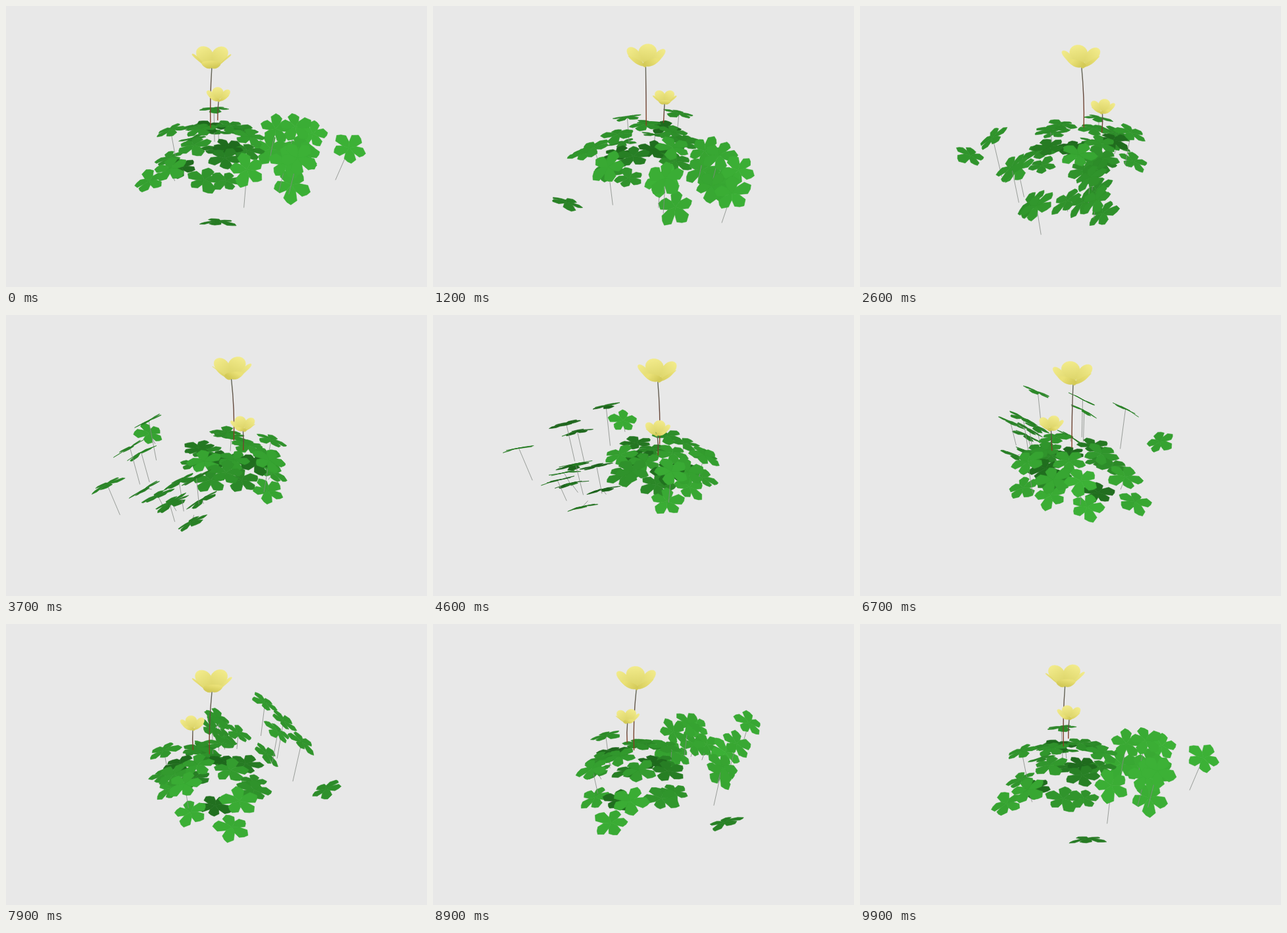
Recreate the animation shown at these times as an HTML page with a canvas. Size 640x427 px, loop 10000 ms.

```html
<!DOCTYPE html>
<html lang="en">
<head>
<meta charset="utf-8">
<title>Rotating plant</title>
<style>
  html, body { margin: 0; width: 100%; height: 100%; overflow: hidden; background: #e8e8e8; }
  canvas { display: block; width: 100vw; height: 100vh; }
</style>
</head>
<body>
<canvas id="stage" width="640" height="427"></canvas>
<script>
const ctx = document.getElementById('stage').getContext('2d');
const RAD = Math.PI / 180;
const STEP_MS = 100, STEPS = 100, STEP_DEG = 3.564;
const CX = 326, CY = 232;
const SIN = 0.52, COS = 0.855, DIST = 1065;
const GROUND = -15;

// Each leaf: distance from the axis, azimuth, height, optional facing azimuth.
const spots = [
  [190, 12, 42], [160, 91, 0, 270], [122, 73, 54], [117, -13, 41],
  [147, -14, 24], [127, 2, 10], [122, -8, 4], [118, 28, -11],
  [118, 39, 38], [134, 37, 50], [86, -24, -3], [119, -22, -21],
  [112, 160, -15], [85, 150, 9], [60, 113, -2], [50, 80, -8],
  [85, 199, -15], [60, 176, -13], [90, -92, -4], [80, -124, -2],
  [40, -93, -6], [45, -23, 5], [85, -97, 42], [45, 150, 37],
  [38, 80, 24], [42, 222, 36], [42, 290, 36], [45, -10, 34],
  [55, -50, 25], [75, 235, 22], [60, -105, 25], [85, 205, 30],
  [90, -20, 35], [12, 0, 20]
];

function seeded(seed) {
  return () => {
    seed = (seed * 16807) % 2147483647;
    return seed / 2147483647;
  };
}
const rand = seeded(4177);

const leaves = spots.map(([r, az, h, face]) => {
  const outer = r > 80;
  const cluster = outer && az > -30 && az < 80;
  const inShade = r < 65 && h < 26;
  return {
    r, az, h,
    face: face ?? (cluster ? 85 : az),
    tilt: cluster ? 30 + rand() * 8 : face ? 28 : r < 70 ? 9 : 15 + rand() * 9,
    size: 23.5 + rand() * 4.5,
    spin: rand() * 72,
    shade: inShade ? 0.35 + rand() * 0.5 : 0.86 + rand() * 0.16,
    lobes: Array.from({ length: 5 }, () => ({
      len: 0.86 + rand() * 0.2, bend: rand() * 0.4 - 0.27
    }))
  };
});

const flowers = [
  { r: 15.6, az: 218, h: 146, size: 28, cup: 22, root: [20, 222, 46], spin: 20 },
  { r: 41, az: -94, h: 77.5, size: 18, cup: 14, root: [41, -96, 44], spin: 48 }
];

// World points are [right, toward viewer, up].
function polar(r, deg, h) {
  return [r * Math.cos(deg * RAD), r * Math.sin(deg * RAD), h];
}
const depth = ([, d, h]) => d * COS + h * SIN;

function project(p) {
  const s = 1 / (1 - depth(p) / DIST);
  return [CX + p[0] * s, CY + (p[1] * SIN - p[2] * COS) * s];
}

function polygon(points, fill) {
  ctx.beginPath();
  points.forEach(p => ctx.lineTo(...project(p)));
  ctx.closePath();
  ctx.fillStyle = ctx.strokeStyle = fill;
  ctx.lineWidth = 0.6;
  ctx.fill();
  ctx.stroke();
}

function line(from, to, color, width) {
  ctx.beginPath();
  ctx.moveTo(...project(from));
  ctx.lineTo(...project(to));
  ctx.strokeStyle = color;
  ctx.lineWidth = width;
  ctx.stroke();
}

function green(light) {
  const t = Math.max(0, Math.min(1, light));
  const mix = (a, b) => Math.round(a + (b - a) * t);
  return `rgb(${mix(20, 60)},${mix(80, 177)},${mix(20, 54)})`;
}

const outline = [[-36, 0.4], [-26, 0.8], [-10, 0.93], [3, 1.02], [24, 0.84], [36, 0.4]];

function drawLeaf(leaf, turn) {
  const c = polar(leaf.r, leaf.az + turn, leaf.h);
  if (leaf.r > 75) {
    line(c, polar(leaf.r * 0.92, leaf.az + turn, GROUND), '#858a85', 0.8);
  }
  const a = (leaf.face + turn) * RAD, t = leaf.tilt * RAD;
  const side = [-Math.sin(a), Math.cos(a), 0];
  const down = [Math.cos(t) * Math.cos(a), Math.cos(t) * Math.sin(a), -Math.sin(t)];
  const normal = [Math.sin(t) * Math.cos(a), Math.sin(t) * Math.sin(a), Math.cos(t)];

  leaf.lobes.forEach((lobe, i) => {
    const mid = leaf.spin + i * 72;
    const at = (deg, r) => {
      const u = r * Math.cos(deg * RAD), v = r * Math.sin(deg * RAD);
      const w = Math.max(0, r - 0.4 * leaf.size) * lobe.bend;
      return c.map((x, k) => x + side[k] * u + down[k] * v + normal[k] * w);
    };
    const radial = side.map((x, k) => x * Math.cos(mid * RAD) + down[k] * Math.sin(mid * RAD));
    const facing = depth(normal) - lobe.bend * 0.35 * depth(radial);
    const light = facing > 0 ? 0.42 + 0.7 * facing : 0.2 - 0.4 * facing;
    const points = outline.map(([deg, r]) =>
      at(mid + deg, r * leaf.size * (r > 0.5 ? lobe.len : 1)));
    polygon([c, ...points], green(light * leaf.shade));
  });
}

function drawStem(f, turn) {
  const top = project(polar(f.r, f.az + turn, f.h));
  const foot = project(polar(f.root[0], f.root[1] + turn, f.root[2]));
  const bend = project(polar(f.root[0] + 1, f.root[1] + turn, (f.h + f.root[2]) / 2));
  const paint = ctx.createLinearGradient(...top, ...foot);
  paint.addColorStop(0, '#626a5c');
  paint.addColorStop(0.45, '#62473b');
  paint.addColorStop(1, '#8a3d20');
  ctx.beginPath();
  ctx.moveTo(...top);
  ctx.quadraticCurveTo(...bend, ...foot);
  ctx.strokeStyle = paint;
  ctx.lineWidth = 1.4;
  ctx.stroke();
}

function drawFlower(f, turn) {
  const c = polar(f.r, f.az + turn, f.h);
  const at = (deg, u) => {
    const p = polar(f.size * u ** 0.7, deg, f.cup * u ** 1.5);
    return p.map((x, k) => x + c[k]);
  };
  const petals = Array.from({ length: 5 }, (_, i) => f.spin + i * 72 + turn);
  petals.sort((a, b) => Math.sin(a * RAD) - Math.sin(b * RAD));
  for (const mid of petals) {
    const points = Array.from({ length: 28 }, (_, i) => {
      const a = i / 28 * 2 * Math.PI;
      return at(mid + 40 * Math.sin(a), 0.5 - 0.5 * Math.cos(a));
    });
    const front = Math.sin(mid * RAD) > 0.25;
    const paint = ctx.createLinearGradient(...project(c), ...project(at(mid, 1)));
    paint.addColorStop(0, front ? '#d3ca58' : '#d9d164');
    paint.addColorStop(1, front ? '#eae177' : '#f2eb8b');
    polygon(points, paint);
  }
}

function draw(turn) {
  ctx.fillStyle = '#e8e8e8';
  ctx.fillRect(0, 0, 640, 427);
  const items = leaves.map(leaf => ({
    z: depth(polar(leaf.r, leaf.az + turn, leaf.h)),
    paint: () => drawLeaf(leaf, turn)
  }));
  for (const f of flowers) {
    const [r, az, h] = f.root;
    items.push(
      { z: depth(polar(r, az + turn, h)) + 10, paint: () => drawStem(f, turn) },
      { z: depth(polar(f.r, f.az + turn, f.h)) + 20, paint: () => drawFlower(f, turn) }
    );
  }
  items.sort((a, b) => a.z - b.z).forEach(item => item.paint());
}

const start = performance.now();
function tick() {
  const step = Math.floor((performance.now() - start) / STEP_MS) % STEPS;
  draw(step * STEP_DEG);
  requestAnimationFrame(tick);
}
tick();
</script>
</body>
</html>
```
